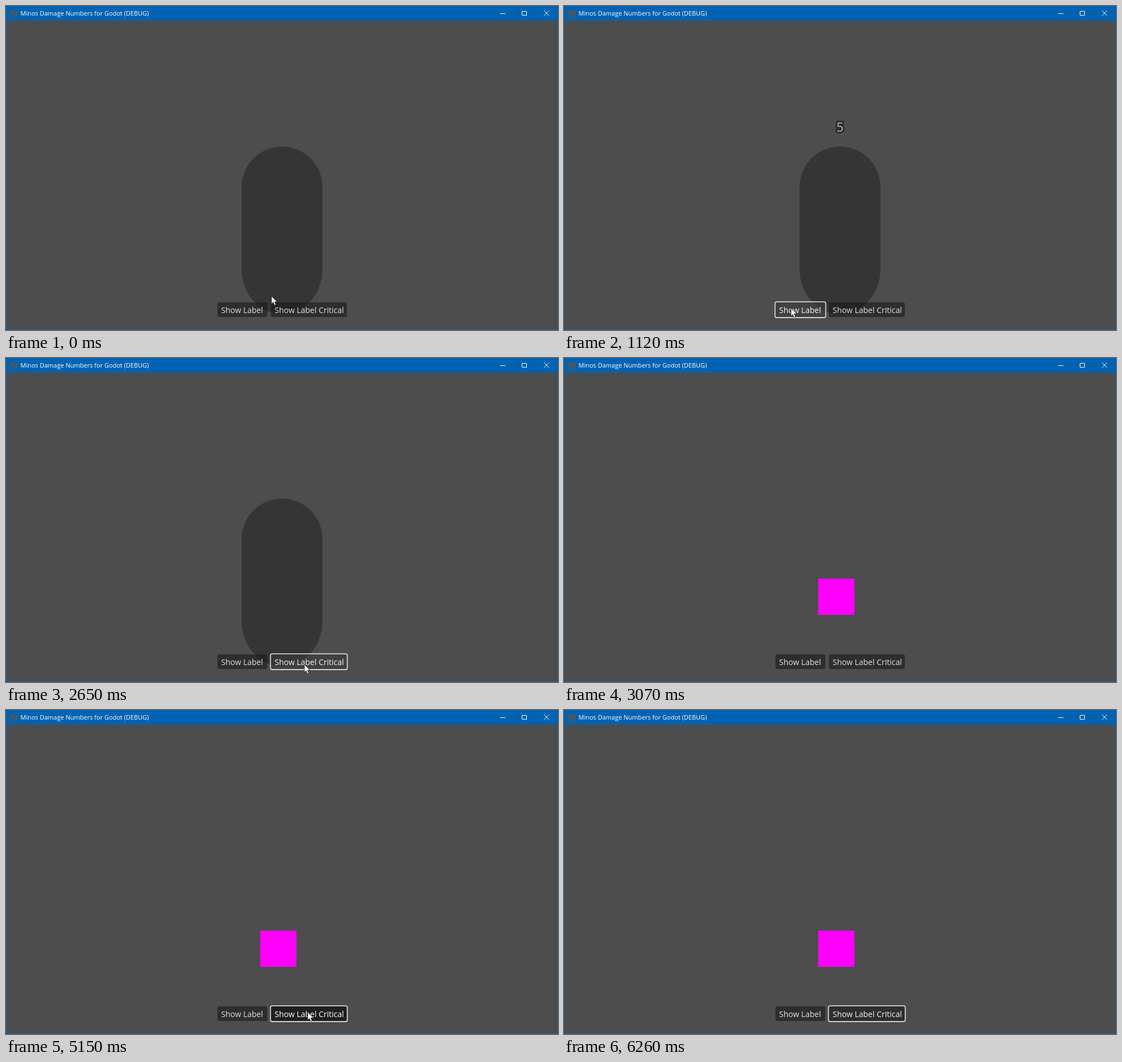
These frames come from a looping animation (975x574 px, 6330 ms). An HTML page with a canvas:

```html
<!DOCTYPE html>
<html lang="en">
<head>
<meta charset="utf-8">
<title>Damage numbers</title>
<style>
html, body { margin: 0; height: 100%; overflow: hidden; background: #4d4d4d; }
canvas { display: block; }
</style>
</head>
<body>
<canvas id="stage" width="975" height="574"></canvas>
<script>
const ctx = document.getElementById('stage').getContext('2d');
const LOOP = 6330, CUT = 3070;

// Cursor path: [time, x, y] of the tip
const path = [
  [0, 469, 514], [290, 401, 535.5], [1190, 401, 535.5], [1540, 533, 535.5],
  [2430, 533, 535.5], [2900, 520, 552], [CUT - 1, 500, 552],
  [CUT, 455, 580], [3490, 430, 545.5], [4400, 430, 545.5],
  [4890, 533, 535.5], [5830, 533, 535.5], [6230, 505, 580], [LOOP, 505, 580]
];
// Clicks: press, release, button index
const clicks = [[420, 555, 0], [1800, 1850, 1], [3770, 3840, 0], [5150, 5215, 1]];
const buttons = [
  { text: 'Show Label', x: 373.5, w: 88 },
  { text: 'Show Label Critical', x: 468, w: 134 }
];

function cursorAt(t) {
  const i = path.findIndex(p => p[0] > t);
  const [t0, x0, y0] = path[i - 1], [t1, x1, y1] = path[i];
  const p = (t - t0) / (t1 - t0), k = p * p * (3 - 2 * p);
  return [x0 + (x1 - x0) * k, y0 + (y1 - y0) * k];
}

function rect(color, x, y, w, h) {
  ctx.fillStyle = color;
  ctx.fillRect(x, y, w, h);
}

function text(str, x, y, font, color) {
  ctx.font = font;
  ctx.fillStyle = color;
  ctx.fillText(str, x, y);
}

function drawWindow() {
  rect('#0063b1', 0, 0, 975, 574);
  rect('#4d4d4d', 1, 26, 973, 547);
  rect('#3d5a73', 8, 7, 13, 13);
  text('Minos Damage Numbers for Godot (DEBUG)', 25.5, 17, '11px "Open Sans", sans-serif', '#fff');
  ctx.strokeStyle = '#fff';
  ctx.lineWidth = 1;
  ctx.beginPath();
  ctx.moveTo(873, 13.5);
  ctx.lineTo(882, 13.5);
  ctx.rect(911.5, 9.5, 8, 7);
  ctx.moveTo(950.5, 8.5);
  ctx.lineTo(959, 17);
  ctx.moveTo(959, 8.5);
  ctx.lineTo(950.5, 17);
  ctx.stroke();
}

function drawCapsule() {
  ctx.fillStyle = '#353535';
  ctx.beginPath();
  ctx.ellipse(487.5, 321, 71.5, 72, 0, Math.PI, 0);
  ctx.ellipse(487.5, 466, 71.5, 80, 0, 0, Math.PI);
  ctx.fill();
}

function drawButton({ text: label, x, w }, hover, pressed, focus) {
  ctx.fillStyle = pressed ? 'rgba(0,0,0,.6)' : hover ? 'rgba(57,57,57,.6)' : 'rgba(26,26,26,.6)';
  ctx.beginPath();
  ctx.roundRect(x, 525, w, 26, 3);
  ctx.fill();
  if (focus) {
    ctx.strokeStyle = 'rgba(255,255,255,.75)';
    ctx.lineWidth = 1.8;
    ctx.beginPath();
    ctx.roundRect(x - .8, 524.2, w + 1.6, 27.8, 3);
    ctx.stroke();
  }
  text(label, x + 6.5, 543.5, '500 14px "Open Sans", sans-serif', pressed ? '#fff' : hover || focus ? '#f2f2f2' : '#dfdfdf');
}

// A number pops up, drops back and fades
function drawNumber(age, x, base, color) {
  const rise = 1 - (1 - Math.min(age / 180, 1)) ** 3;
  const fall = Math.max(0, (age - 250) / 500);
  ctx.globalAlpha = Math.min(1, (710 - age) / 270);
  ctx.textAlign = 'center';
  ctx.lineJoin = 'round';
  ctx.lineWidth = 5;
  ctx.strokeStyle = '#000';
  ctx.font = '600 23px "Open Sans", sans-serif';
  const y = base - 50 * (rise - fall) + 8.5;
  ctx.strokeText('5', x, y);
  text('5', x, y, ctx.font, color);
  ctx.textAlign = 'left';
  ctx.globalAlpha = 1;
}

function drawCursor(x, y) {
  ctx.beginPath();
  [[0, 0], [0, 14], [3, 11], [5.3, 16.3], [7.7, 15.2], [5.5, 10], [10, 10]]
    .forEach(([dx, dy]) => ctx.lineTo(x + dx, y + dy));
  ctx.closePath();
  ctx.lineWidth = .8;
  ctx.strokeStyle = '#222';
  ctx.fillStyle = '#fff';
  ctx.fill();
  ctx.stroke();
}

function draw(t) {
  const flat = t >= CUT;
  const [cx, cy] = cursorAt(t);
  const last = clicks.filter(c => c[0] <= t && c[0] >= CUT === flat).pop();
  drawWindow();
  if (flat) rect('#f0f', 449, 391, 64, 64);
  else drawCapsule();
  buttons.forEach((b, i) => {
    const hover = cx >= b.x && cx < b.x + b.w && cy >= 525 && cy < 551;
    const focus = !!last && last[2] === i;
    drawButton(b, hover, focus && t < last[1], focus);
  });
  for (const [press, release, kind] of clicks) {
    const age = t - release;
    if (age >= 0 && age < 710 && press >= CUT === flat)
      drawNumber(age, flat ? 481.5 : 487.5, flat ? 378 : 233, kind ? '#e8474b' : '#fff');
  }
  ctx.save();
  ctx.beginPath();
  ctx.rect(0, 0, 975, 573);
  ctx.clip();
  drawCursor(cx, cy);
  ctx.restore();
}

const start = performance.now();
function tick() {
  draw((performance.now() - start) % LOOP);
  requestAnimationFrame(tick);
}
tick();
</script>
</body>
</html>
```
